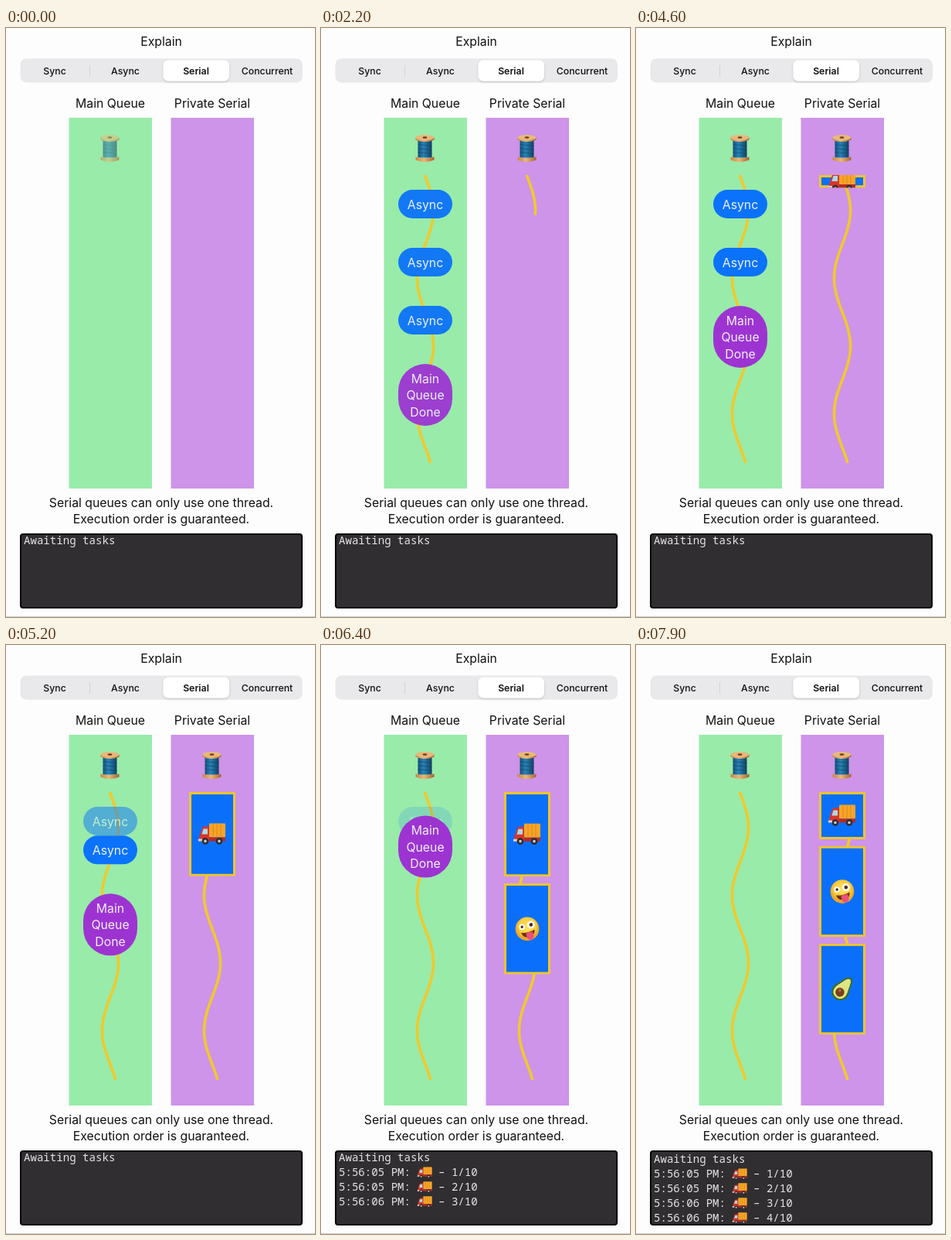
These frames come from a looping animation (400x761 px, 8000 ms). An HTML page:

```html
<!DOCTYPE html>
<html lang="en">
<head>
<meta charset="utf-8">
<style>
  html, body { margin: 0; width: 100%; height: 100%; overflow: hidden; background: #fefdfe; }
  #stage { display: block; width: 400px; height: 761px; }
  text { font: 15.8px Inter, Roboto, sans-serif; fill: #111; text-anchor: middle; }
  .tab text { font-size: 12.3px; font-weight: 500; }
  .tab .on { font-weight: 600; }
  .pill text { fill: #eef2fd; }
  #log text { font: 14.1px "Noto Sans Mono", "DejaVu Sans Mono", monospace; fill: #e6e4e6; text-anchor: start; white-space: pre; }
  .thread { fill: none; stroke: #efca2c; stroke-width: 3.6; }
</style>
</head>
<body>
<svg id="stage" viewBox="0 0 400 761">
  <defs>
    <filter id="soft" x="-10%" y="-20%" width="120%" height="150%">
      <feDropShadow dx="0" dy="1.5" stdDeviation="1.5" flood-opacity=".16"/>
    </filter>
    <linearGradient id="wood">
      <stop offset="0" stop-color="#c98545"/><stop offset=".45" stop-color="#e9b878"/><stop offset="1" stop-color="#a8622d"/>
    </linearGradient>
    <linearGradient id="yarn">
      <stop offset="0" stop-color="#174f78"/><stop offset=".4" stop-color="#2683b6"/><stop offset="1" stop-color="#123f61"/>
    </linearGradient>
    <radialGradient id="face" cx=".5" cy=".4">
      <stop offset="0" stop-color="#ffe45c"/><stop offset=".7" stop-color="#fbcd3e"/><stop offset="1" stop-color="#eda529"/>
    </radialGradient>

    <g id="spool">
      <path d="M-9 -11H9V12H-9Z" fill="url(#yarn)"/>
      <path d="M-9 -5L9 -3M-9 0L9 2M-9 5L9 7" stroke="#123f61" stroke-opacity=".55"/>
      <path d="M-12 11Q0 14 12 11V15Q0 20 -12 15Z" fill="url(#wood)"/>
      <path d="M-12 -14V-11Q0 -6 12 -11V-14Z" fill="url(#wood)"/>
      <ellipse cy="-14" rx="12" ry="3.6" fill="#e8b87b"/>
      <ellipse cy="-14" rx="3" ry="1.2" fill="#6b3b1c"/>
    </g>

    <g id="truck">
      <path d="M-16 1L-13 -8Q-12 -10 -10 -10H-4V9H-17V4Z" fill="#d8352b"/>
      <path d="M-13.500 0L-11.500 -7H-6V0Z" fill="#a9dbe8"/>
      <rect x="-4" y="-14" width="21" height="18" rx="1" fill="#f7a528"/>
      <path d="M1 -13V3M6 -13V3M11 -13V3" stroke="#dd861c"/>
      <path d="M-4 4H17V9H-4Z" fill="#b52b25"/>
      <path d="M-18 6H-13V9H-18Z" fill="#d8d4d0"/>
      <g fill="#2f2d31" stroke="#c4c1c2" stroke-width="0">
        <circle cx="-9" cy="9" r="4.300"/><circle cx="9" cy="9" r="4.300"/>
      </g>
      <g fill="#cfcbcb"><circle cx="-9" cy="9" r="1.800"/><circle cx="9" cy="9" r="1.800"/></g>
    </g>

    <g id="zany">
      <circle r="15.300" fill="url(#face)"/>
      <g transform="rotate(-14)">
        <path d="M-9 3Q0 6 9 3Q8 11 0 11Q-8 11 -9 3Z" fill="#6b3213"/>
        <path d="M-3 5.500Q1 4 6 5.500V11Q5 15 1.500 15Q-2 15 -3 11Z" fill="#ef4f79"/>
        <circle cx="-6" cy="-4" r="3.800" fill="#fff"/>
        <circle cx="6" cy="-4" r="5" fill="#fff"/>
        <circle cx="-6" cy="-4" r="1.700" fill="#54290f"/>
        <circle cx="6" cy="-4" r="2.300" fill="#54290f"/>
      </g>
    </g>

    <g id="avocado" transform="rotate(38)">
      <path id="pear" d="M0 -18C6 -18 6 -9 9 -3C14 7 9 15 0 15C-9 15 -14 7 -9 -3C-6 -9 -6 -18 0 -18Z" fill="#3e6b22"/>
      <use href="#pear"/>
      <path d="M0 -16C4 -16 5 -8 7.500 -2C11 7 7 13 0 13C-7 13 -11 7 -7.500 -2C-5 -8 -4 -16 0 -16Z" fill="#dfe585"/>
      <circle cy="5" r="5.800" fill="#7a3f1d"/>
      <circle cx="-1.500" cy="3" r="2" fill="#a9683a"/>
    </g>
  </defs>

  <rect width="400" height="761" fill="#fefdfe"/>
  <text x="201" y="23">Explain</text>
  <g class="tab">
    <rect x="18.500" y="39.500" width="365.500" height="31" rx="8" fill="#e9e8ea"/>
    <path d="M108.500 48V63" stroke="#d3d2d5"/>
    <rect x="203.500" y="41.500" width="85.500" height="27" rx="6.500" fill="#fff" filter="url(#soft)"/>
    <text x="63" y="59.500">Sync</text>
    <text x="154.500" y="59.500">Async</text>
    <text x="246" y="59.500" class="on">Serial</text>
    <text x="338" y="59.500">Concurrent</text>
  </g>
  <text x="135" y="102.500">Main Queue</text>
  <text x="267" y="102.500">Private Serial</text>
  <rect x="81.500" y="116" width="107.500" height="479" fill="#99ebaa"/>
  <rect x="213.500" y="116" width="107.500" height="479" fill="#cd94e9"/>
  <text x="201" y="618.500">Serial queues can only use one thread.</text>
  <text x="201" y="640">Execution order is guaranteed.</text>
  <rect x="19" y="654" width="364" height="95" rx="3" fill="#302e30" stroke="#050505" stroke-width="2"/>
  <path d="M0 760.500H400" stroke="#cfced0"/>

  <use id="spoolA" href="#spool" x="134.500" y="155.500"/>
  <use id="spoolB" href="#spool" x="266.500" y="155.500"/>
  <path id="threadA" class="thread"/>
  <path id="threadB" class="thread"/>
  <g id="pills"></g>
  <g id="boxes"></g>
  <g id="log"></g>
</svg>
<script>
const LOOP = 8000, FULL = 117.5, GAP = 8.7, SLOT = 75;
const el = id => document.getElementById(id);
const ramp = (t, start, len) => Math.min(1, Math.max(0, (t - start) / len));
const ease = (t, start, len) => { const u = ramp(t, start, len); return u * u * (3 - 2 * u); };

const taps = [3750, 4800, 5800, 6850];
const growths = [4368, 5393, 6380];
const logTimes = [5500, 5900, 6400, 6850];

// Buttons waiting on the main queue
const pill = (words, h, fill) => `<g class="pill">
  <rect x="100" width="70" height="${h}" rx="${Math.min(h / 2, 35)}" fill="${fill}"/>
  ${words.map((w, i) => `<text x="135" y="${24.5 + i * 21.5}">${w}</text>`).join('')}</g>`;
el('pills').innerHTML = pill(['Async'], 37, '#0b72fb').repeat(3) +
  pill(['Main', 'Queue', 'Done'], 80, '#9d34d2');
const pills = [...el('pills').children];

// Tasks running on the private queue
el('boxes').innerHTML = ['truck', 'zany', 'avocado'].map(name =>
  `<svg x="237" width="60" height="0">
    <rect x="1.500" y="1.500" width="57" fill="#0a70fb" stroke="#f0c52b" stroke-width="3"/>
    <use href="#${name}" x="30"/></svg>`).join('');
const boxes = [...el('boxes').children];

el('log').innerHTML = '<text x="23" y="667">Awaiting tasks</text>' + logTimes.map((_, i) => {
  const y = 686 + i * 18.9;
  return `<g><text x="23" y="${y}">5:56:0${i < 2 ? 5 : 6} PM:</text>
    <use href="#truck" transform="translate(134.500 ${y - 4}) scale(.54)"/>
    <text x="152" y="${y}">– ${i + 1}/10</text></g>`;
}).join('');
const lines = [...el('log').children].slice(1);

function drawThread(id, cx, amount) {
  const end = 190 + 372 * amount;
  let d = '';
  for (let y = 190; amount && y < end + 2; y += 2) {
    const yy = Math.min(y, end);
    d += `${d ? 'L' : 'M'}${cx + 10.5 * Math.sin((yy - 192) / 175 * 2 * Math.PI)} ${yy}`;
  }
  el(id).setAttribute('d', d);
}

function drawBox(box, y, h) {
  const [frame, icon] = box.children;
  box.style.display = h < 1 ? 'none' : '';
  box.setAttribute('y', y);
  box.setAttribute('height', h);
  frame.setAttribute('height', Math.max(0, h - 3));
  icon.setAttribute('y', h / 2);
}

function draw(t) {
  el('spoolA').style.opacity = 0.55 + 0.45 * ramp(t, 0, 300);
  el('spoolB').style.opacity = ramp(t, 950, 350);
  drawThread('threadA', 135, ease(t, 325, 1500));
  drawThread('threadB', 267, ease(t, 1850, 1500));

  const gone = taps.map(start => ease(t, start, 800));
  const shown = ease(t, 1900, 350);
  let y = 209;
  pills.forEach((p, i) => {
    p.setAttribute('transform', `translate(0 ${y})`);
    p.style.opacity = shown * (1 - gone[i]);
    y += SLOT * (1 - gone[i]);
  });

  let top = 190;
  boxes.forEach((box, i) => {
    const grown = ease(t, growths[i], 1000);
    const spent = i ? 0 : Math.max(0, t - 6146) * 0.0322;
    const h = FULL * grown - spent;
    drawBox(box, top, h);
    top += h + GAP * Math.min(1, grown * 4);
  });

  lines.forEach((line, i) => line.style.display = t >= logTimes[i] ? '' : 'none');
  el('log').setAttribute('transform', `translate(0 ${t >= logTimes[3] ? 2 : 0})`);
}

const begin = performance.now();
function tick() {
  draw((performance.now() - begin) % LOOP);
  requestAnimationFrame(tick);
}
tick();
</script>
</body>
</html>
```
